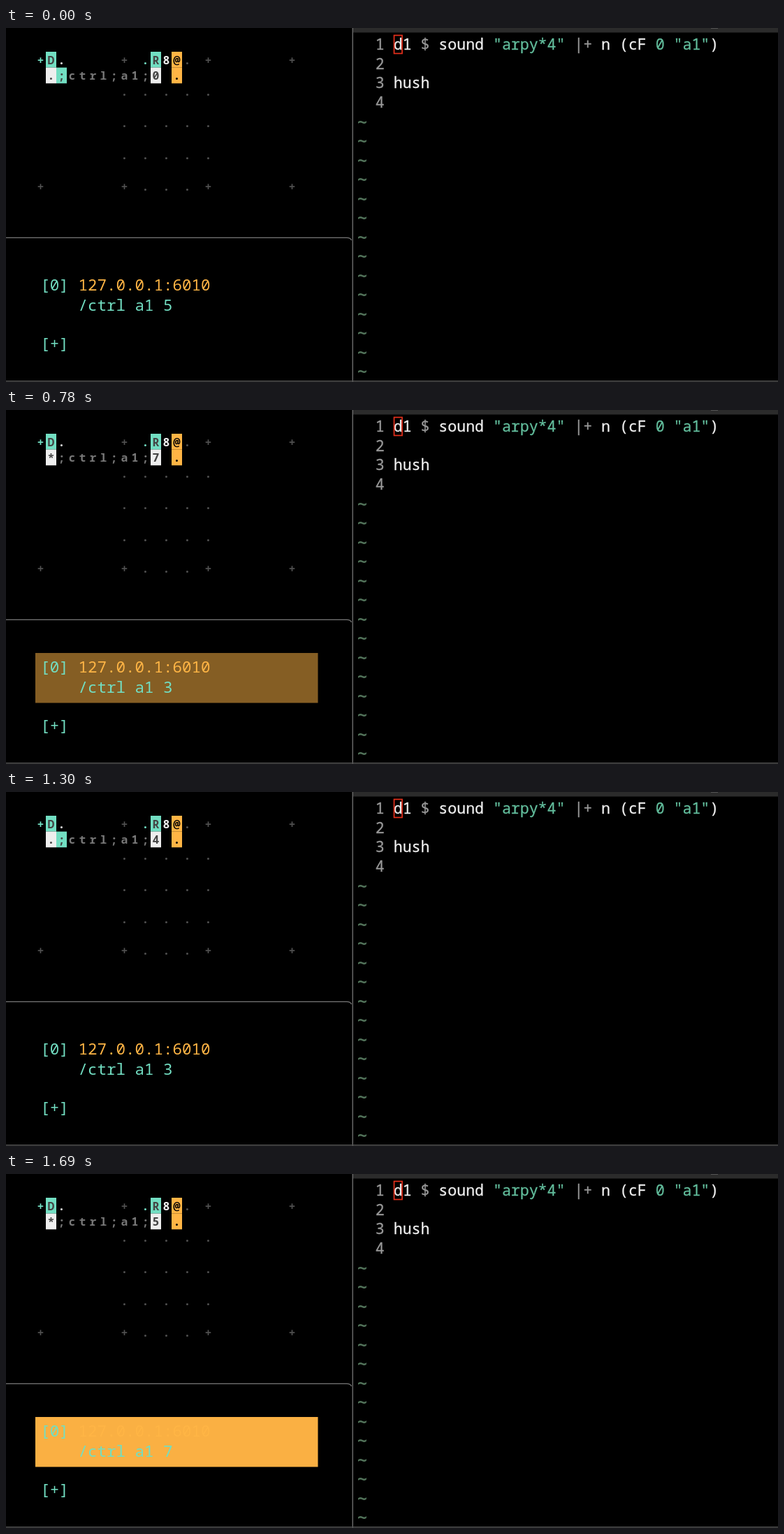
An HTML page with a canvas for the animation above (1.82 s loop, 1105 px wide and 507 px high).

```html
<!DOCTYPE html>
<html lang="en">
<head>
<meta charset="utf-8">
<style>
html, body { margin: 0; width: 100%; height: 100%; overflow: hidden; background: #000; }
canvas { display: block; }
</style>
</head>
<body>
<canvas id="stage" width="1105" height="507"></canvas>
<script>
const ctx = document.getElementById('stage').getContext('2d');
const MONO = '"Noto Sans Mono", "DejaVu Sans Mono", monospace';
const WIDE = '"DejaVu Sans Mono", monospace';
const MINT = '#72dec2', AMBER = '#ffb545', WHITE = '#eee', GRAY = '#777', DIM = '#505050', INK = '#444';
const GREEN = '#62bd9c', PALE = '#999';
const TICK = 130;
const DIGITS = '04162376154275';     // random value shown at each tick
const GLOW = { 6: .52, 7: .04, 13: .98 };  // message flash after each bang

function rect(x, y, w, h, color) {
  ctx.fillStyle = color;
  ctx.fillRect(x, y, w, h);
}

// A thin outline of the given weight thickens the letters
function text(s, x, y, color, weight = 0) {
  ctx.fillStyle = ctx.strokeStyle = color;
  ctx.fillText(s, x, y);
  if (!weight) return;
  ctx.lineWidth = weight;
  ctx.strokeText(s, x, y);
}

// One character per 15px column, optionally on a coloured cell
function cells(s, col, row, color, back) {
  [...s].forEach((ch, i) => {
    const x = 49.5 + (col + i) * 15, y = 45.6 + row * 22.65;
    if (back) rect(x - 7.5, y - 11.6, 15, 22.65, back);
    text(ch, x, y + 6.2, color);
  });
}

function drawGrid(tick, bang) {
  ctx.textAlign = 'center';
  ctx.font = '600 16.5px ' + MONO;
  for (const row of [2, 4, 6])
    for (let col = 8; col <= 16; col += 2) cells('.', col, row, DIM);
  for (const col of [10, 12, 14]) cells('.', col, 8, DIM);
  for (const col of [0, 8, 16, 24]) {
    if (col) cells('+', col, 0, DIM);
    cells('+', col, 8, DIM);
  }
  cells('.', 14, 0, DIM);
  cells(';ctrl;a1;', 2, 1, GRAY);

  cells('+', 0, 0, MINT);
  cells('D', 1, 0, INK, MINT);
  cells('.', 2, 0, WHITE);
  cells('.', 10, 0, MINT);
  cells('R', 11, 0, INK, MINT);
  cells('8', 12, 0, WHITE);
  cells('@', 13, 0, '#000', AMBER);
  cells(bang ? '*' : '.', 1, 1, INK, WHITE);
  if (!bang) cells(';', 2, 1, INK, MINT);
  cells(DIGITS[tick], 11, 1, INK, WHITE);
  cells('.', 13, 1, '#000', AMBER);
}

function drawMessages(tick) {
  ctx.strokeStyle = '#777';
  ctx.lineWidth = 1.3;
  ctx.beginPath();
  ctx.moveTo(0, 300.3);
  ctx.lineTo(488, 300.3);
  ctx.quadraticCurveTo(493, 300.3, 494.5, 304);
  ctx.stroke();

  ctx.globalAlpha = GLOW[tick] || 0;
  rect(42, 348, 404.5, 71.5, '#ffb445');
  ctx.globalAlpha = 1;

  const sent = tick < 6 ? 5 : tick < 13 ? 3 : 7;
  ctx.textAlign = 'left';
  ctx.font = '22.5px ' + MONO;
  text('[0]', 49.3, 376, MINT);
  text('127.0.0.1:6010', 103.4, 376, AMBER);
  text('/ctrl a1 ' + sent, 103.4, 405, MINT);
  text('[+]', 49.3, 460, MINT);
}

function drawEditor() {
  const left = 503, pitch = 12.93, line = 27.5, base = 31;
  rect(497, 0, 608, 6.5, '#2b2b2b');
  rect(1009, 0, 10, 1, '#555');
  rect(495.5, 0, 1.5, 507, '#666');
  rect(0, 505, 1105, 1.5, '#555');

  ctx.textAlign = 'left';
  ctx.font = 'bold 23px ' + WIDE;
  for (let i = 4; i < 18; i++) text('~', left, base + .5 + i * line, '#52735a');

  ctx.font = '21.55px ' + MONO;
  for (let i = 0; i < 4; i++) text(i + 1, left + 2 * pitch, base + i * line, PALE, .3);
  const code = [
    ['d1 ', WHITE], ['$ ', PALE], ['sound ', WHITE], ['"arpy*4" ', GREEN],
    ['|+ ', PALE], ['n (cF ', WHITE], ['0 "a1"', GREEN], [')', WHITE]
  ];
  let col = 4;
  for (const [s, color] of code) {
    text(s, left + col * pitch, base, color, .3);
    col += s.length;
  }
  text('hush', left + 4 * pitch, base + 2 * line, WHITE, .3);

  ctx.strokeStyle = '#e8301c';
  ctx.lineWidth = 1.7;
  ctx.strokeRect(555.5, 10.5, 11.5, 26);
}

function draw(now) {
  const tick = Math.floor(now / TICK) % DIGITS.length;
  rect(0, 0, 1105, 507, '#000');
  drawGrid(tick, tick === 6 || tick === 13);
  drawMessages(tick);
  drawEditor();
}

const start = performance.now();
function loop() {
  draw(performance.now() - start);
  requestAnimationFrame(loop);
}
loop();
</script>
</body>
</html>
```
